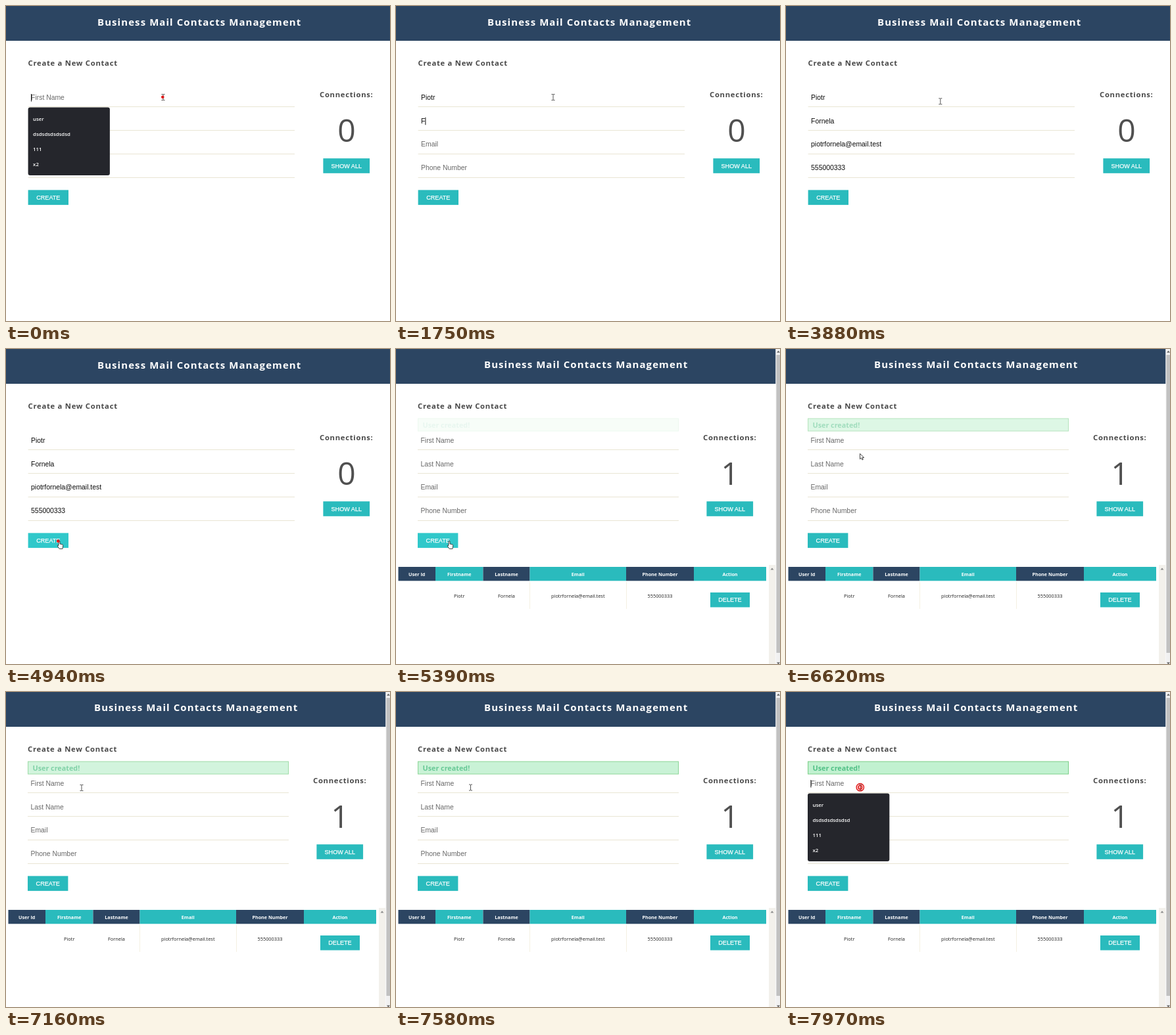
An HTML page for the animation above (8 s loop, 584 px wide and 480 px high).

```html
<!DOCTYPE html>
<html lang="en">
<head>
<meta charset="utf-8">
<title>Contacts</title>
<style>
  html, body { margin: 0; width: 100%; height: 100%; overflow: hidden; background: #fff; }
  svg { display: block; width: 584px; height: 480px; }
  text { white-space: pre; }
  .ui { font-family: "Open Sans", "Noto Sans", sans-serif; }
  .form { font-family: "Liberation Sans", Arial, sans-serif; }
  .title { font-size: 15px; font-weight: 700; letter-spacing: 1.07px; fill: #fff; }
  .heading { font-size: 11.3px; font-weight: 700; letter-spacing: .7px; fill: #484848; }
  .count { font-size: 48px; fill: #505050; }
  .input { font-size: 10.4px; fill: #111; }
  .button { font-size: 9.1px; fill: #fff; stroke: #fff; stroke-width: .25px; }
  .option { font-size: 7.8px; font-weight: 600; fill: #fff; }
  .notice { font-size: 10.8px; font-weight: 700; fill: #2bb36c; }
  .th { font-size: 7.2px; font-weight: 700; fill: #fff; }
  .td { font-size: 7.4px; fill: #222; }
  .mid { text-anchor: middle; }
</style>
</head>
<body>
<svg id="stage" viewBox="0 0 584 480"></svg>
<script>
const LOOP = 8000, PAGE_CHANGE = 5030;
const NAVY = '#2c4562', TEAL = '#2abbbd', TEAL_HOVER = '#30c8ca';
const ROWS = [143, 178.7, 214.3, 249.8];
const HINTS = ['First Name', 'Last Name', 'Email', 'Phone Number'];
const PERSON = ['Piotr', 'Fornela', 'piotrfornela@email.test', '555000333'];

// Time of each keystroke; a single entry fills the field at once.
const KEYS = [
  [210, 770, 970, 1030, 1090],
  [1750, 2180, 2270, 2350, 2440, 2670, 2730],
  [3650],
  [3650]
];
const FOCUS = [[0, 0], [1290, 1], [2990, 2], [3650, -1], [7740, 0]];
const CARET_OFF = [[740, 770], [3490, 3650]];
const POINTER = [
  [0, 239, 139], [3650, 239, 139], [3880, 235, 145], [4370, 150, 272],
  [4530, 150, 272], [4830, 80, 293], [6150, 80, 293], [6620, 112, 159],
  [7160, 115, 146], [7400, 113.5, 145.5]
];
const CLICKS = [0, 4880, 7862];

const stage = document.getElementById('stage');

function add(parent, tag, attrs, text) {
  const el = document.createElementNS('http://www.w3.org/2000/svg', tag);
  for (const key in attrs) el.setAttribute(key, attrs[key]);
  if (text !== undefined) el.textContent = text;
  return parent.appendChild(el);
}
const group = (parent, attrs) => add(parent, 'g', attrs);
const label = (parent, x, y, cls, text) => add(parent, 'text', { x, y, class: cls }, text);
const box = (parent, x, y, width, height, fill, more) =>
  add(parent, 'rect', { x, y, width, height, fill, ...more });
const show = (el, on) => el.setAttribute('visibility', on ? 'visible' : 'hidden');

function button(parent, x, y, width, height, text) {
  const face = box(parent, x, y, width, height, TEAL);
  label(parent, x + width / 2, y + height / 2 + 3.2, 'form button mid', text);
  return face;
}

function page({ x, width, titleX, titleY, sideX, count }) {
  const g = group(stage);
  box(g, 0, 0, width, 53, NAVY);
  label(g, titleX, titleY, 'ui title', 'Business Mail Contacts Management');
  label(g, x, 91, 'ui heading', 'Create a New Contact');
  label(g, sideX, 139.2, 'ui heading', 'Connections:');
  label(g, sideX + 41, 207, 'ui count mid', count);
  button(g, sideX + 5.4, 232.2, 70.7, 22.6, 'SHOW ALL');
  const create = button(g, x, 280.4, 61.4, 22.7, 'CREATE');
  const right = width > 580 ? 439 : 430;
  const inputs = ROWS.map((y, i) => {
    box(g, x, 153 + i * 36, right - x, 1, '#e9e5d4');
    return label(g, x + 4.5, y, 'form input', HINTS[i]);
  });
  const menu = group(g);
  box(menu, x, 154.5, 124.3, 103.5, '#25262c', { rx: 3 });
  ['user', 'dsdsdsdsdsdsd', '111', 'x2'].forEach((text, i) =>
    label(menu, x + 7.5, 174.5 + i * 23.3, 'ui option', text));
  const caret = box(g, x + 4.5, 134, 1, 11.5, '#111');
  return { g, x, create, inputs, menu, caret };
}

function resultTable(parent) {
  const edges = [3.5, 60, 132.5, 203.5, 350, 453, 563];
  const heads = ['User Id', 'Firstname', 'Lastname', 'Email', 'Phone Number', 'Action'];
  const cells = ['', ...PERSON];
  heads.forEach((text, i) => {
    const left = edges[i], width = edges[i + 1] - left, center = left + width / 2;
    box(parent, left, 332, width, 21.3, i % 2 ? TEAL : NAVY);
    label(parent, center, 345.5, 'ui th mid', text);
    if (cells[i]) label(parent, center, 379, 'ui td mid', cells[i]);
  });
  [203, 350].forEach(x => box(parent, x, 355, 1, 41, '#f5f0e2'));
  button(parent, 478, 371, 60, 22.5, 'DELETE');
}

function scrollbars(parent) {
  box(parent, 567, 329, 10, 151, '#f3f1ec');
  add(parent, 'path', { d: 'M569.5 336.5h5l-2.5-3z', fill: '#8a8a8a' });
  box(parent, 577.5, 0, 6.5, 480, '#f1f1f1');
  box(parent, 578.5, 9, 5.5, 454, '#c1c1c1');
  add(parent, 'path', { d: 'M579 5.5h5l-2.5-3zM579 477.5h5l-2.5 3z', fill: '#606060' });
}

const before = page({ x: 33.6, width: 584, titleX: 139, titleY: 30, sideX: 477, count: '0' });
const after = page({ x: 33, width: 577.5, titleX: 134, titleY: 29.3, sideX: 467, count: '1' });
resultTable(after.g);
scrollbars(after.g);
const notice = group(after.g);
box(notice, 33.5, 106, 396, 19, '#b4eec6', { stroke: '#5cc46c' });
label(notice, 40.5, 119.8, 'ui notice', 'User created!');

const pointer = group(stage);
const shapes = {
  beam: add(pointer, 'path', { d: 'M-2.5-4.5h2l.5.5.5-.5h2M0-4v8M-2.5 4.5h2l.5-.5.5.5h2', fill: 'none', stroke: '#555' }),
  arrow: add(pointer, 'path', { d: 'M.5.5v8.3l2-1.8 1.4 3 1.4-.6-1.3-2.9h2.7z', fill: '#fff', stroke: '#333', 'stroke-width': .9 }),
  hand: add(pointer, 'path', { d: 'M0 0q1-1.2 2 0v4l4 1q.8.3.7 1.5l-.7 5H1.2L-1.8 7q-.3-1.3 1.8-.5z', fill: '#fff', stroke: '#333', 'stroke-width': .9 })
};
const ring = group(stage, { fill: '#f00', 'fill-opacity': .15, stroke: '#e01818', 'stroke-width': 1.4 });
const circles = [1, .5].map(scale => ({ scale, el: add(ring, 'circle', {}) }));

function pointerAt(t) {
  const next = POINTER.findIndex(p => p[0] > t);
  if (next < 0) return POINTER[POINTER.length - 1].slice(1);
  const a = POINTER[next - 1], b = POINTER[next];
  const k = (t - a[0]) / (b[0] - a[0]);
  return [a[1] + (b[1] - a[1]) * k, a[2] + (b[2] - a[2]) * k];
}

function typed(i, t) {
  const count = KEYS[i].filter(time => time <= t).length;
  return KEYS[i].length === 1 && count ? PERSON[i] : PERSON[i].slice(0, count);
}

function drawForm(view, t, filled) {
  const values = PERSON.map((_, i) => filled ? typed(i, t) : '');
  view.inputs.forEach((el, i) => {
    const text = values[i] || HINTS[i];
    if (el.textContent !== text) el.textContent = text;
    el.style.fill = values[i] ? '#0c0c0c' : '#686868';
  });
  const field = FOCUS.filter(f => f[0] <= t).pop()[1];
  const lit = field >= 0 && !CARET_OFF.some(([from, to]) => t >= from && t < to);
  show(view.caret, lit);
  if (lit) {
    const width = values[field] ? view.inputs[field].getComputedTextLength() : 0;
    view.caret.setAttribute('x', view.x + 4.4 + width);
    view.caret.setAttribute('y', ROWS[field] - 9);
  }
}

function drawPointer(t, view) {
  const [x, y] = pointerAt(t);
  const overCreate = x > 34 && x < 95 && y > 280 && y < 303;
  const overInput = ROWS.some((_, i) => y > 129 + i * 36 && y < 152 + i * 36);
  const kind = overCreate ? 'hand' : overInput ? 'beam' : 'arrow';
  for (const name in shapes) shapes[name].setAttribute('display', name === kind ? 'inline' : 'none');
  pointer.setAttribute('transform', `translate(${x} ${y})`);
  view.create.setAttribute('fill', overCreate ? TEAL_HOVER : TEAL);

  const start = CLICKS.find(time => t >= time && t < time + 205);
  show(ring, start !== undefined);
  if (start === undefined) return;
  const radius = 1.6 + Math.max(0, t - start - 60) / 12;
  ring.setAttribute('transform', `translate(${x - .7} ${y - .3})`);
  circles.forEach(({ el, scale }) => el.setAttribute('r', radius * scale));
}

function render(t) {
  const done = t >= PAGE_CHANGE;
  const view = done ? after : before;
  before.g.setAttribute('display', done ? 'none' : 'inline');
  after.g.setAttribute('display', done ? 'inline' : 'none');
  notice.setAttribute('opacity', Math.max(0, (t - PAGE_CHANGE) / 3600));
  show(view.menu, t < 210 || t >= 7740);
  drawForm(view, t, !done);
  drawPointer(t, view);
}

const begin = performance.now();
function tick() {
  render((performance.now() - begin) % LOOP);
  requestAnimationFrame(tick);
}
tick();
</script>
</body>
</html>
```
